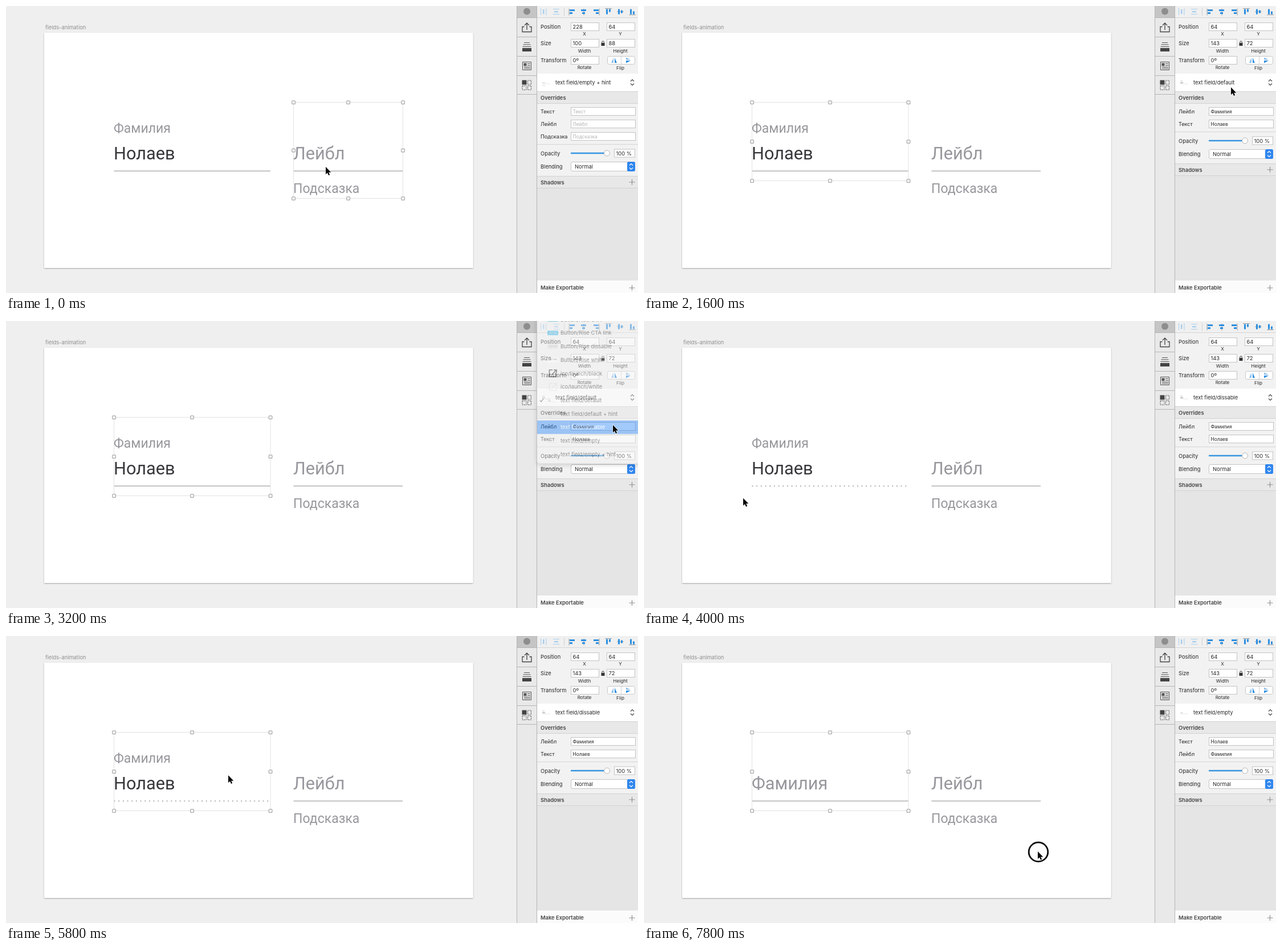
Animation of 1109x505 px, one loop 8 s. Source, as an HTML page:

```html
<!DOCTYPE html>
<html lang="ru">
<head>
<meta charset="utf-8">
<title>Text field symbols</title>
<style>
html, body { margin: 0; width: 100%; height: 100%; overflow: hidden; background: #efefef; }
svg { display: block; width: 100%; height: 100%; }
text { font: 9.35px Inter, sans-serif; fill: #262626; white-space: pre; }
.bold { font-weight: 600; fill: #444; }
.value { font-size: 8.3px; }
.small { font-size: 8.2px; text-anchor: middle; }
.tiny { font-size: 3px; }
.label { font: 23.04px Roboto, sans-serif; fill: #98979d; }
.input { font: 30.72px Roboto, sans-serif; fill: #38373c; }
.empty { fill: #98979d; }
</style>
</head>
<body>
<svg id="stage" viewBox="0 0 1109 505">
  <defs>
    <filter id="shadow" x="-20%" y="-20%" width="140%" height="140%">
      <feDropShadow dx="0" dy="1" stdDeviation="1.2" flood-opacity=".32"/>
    </filter>
    <filter id="menuShadow" x="-20%" y="-20%" width="140%" height="140%">
      <feDropShadow dx="0" dy="3" stdDeviation="4" flood-opacity=".35"/>
    </filter>
  </defs>
  <g id="base"></g>
  <g id="canvas"></g>
  <g id="panel"></g>
  <g id="menu"></g>
  <g id="pointer"></g>
</svg>
<script>
const LOOP = 8000, STEP = 200, ROW = 23.7, MENU_Y = 139.5;
const SURNAME = 'Нолаев';
const layer = id => document.getElementById(id);

const rect = (x, y, w, h, fill, extra = '') =>
  `<rect x="${x}" y="${y}" width="${w}" height="${h}" fill="${fill}" ${extra}/>`;
const path = (d, stroke, width = 1, extra = '') =>
  `<path d="${d}" fill="none" stroke="${stroke}" stroke-width="${width}" ${extra}/>`;
const text = (x, y, s, cls = '', extra = '') =>
  `<text x="${x}" y="${y}" class="${cls}" ${extra}>${s}</text>`;
const field = (x, y, w, s, cls = '', extra = '') =>
  rect(x + .5, y + .5, w - 1, 14, '#fff', 'stroke="#c3c3c3"') + text(x + 3.5, y + 11, s, cls, extra);
const header = (y, s) =>
  rect(932, y, 177, 22, '#e8e8e8') + path(`M932 ${y + .5}h177M932 ${y + 21.5}h177`, '#d2d2d2') +
  text(938, y + 14.5, s, 'bold');
const plus = y => path(`M1093.5 ${y}h10M1098.5 ${y - 5}v10`, '#8d8d8d', 1.1);
const chevrons = (x, y, color) =>
  path(`M${x - 3} ${y - 2}l3-3 3 3M${x - 3} ${y + 2}l3 3 3-3`, color, 1.2);

const SYMBOLS = {
  default: { rows: [['Лейбл', 'Фамилия'], ['Текст', SURNAME]] },
  dissable: { rows: [['Лейбл', 'Фамилия'], ['Текст', SURNAME]] },
  empty: { rows: [['Текст', SURNAME], ['Лейбл', 'Фамилия']] },
  'empty + hint': { rows: [['Текст'], ['Лейбл'], ['Подсказка']] }
};

const ITEMS = ['Button/Rise CTA', 'Button/Rise CTA link', 'Button/Rise dissable', 'Button/Rise white',
  'ico/launch/black', 'ico/launch/white', 'text field/default', 'text field/default + hint',
  'text field/dissable', 'text field/empty', 'text field/empty + hint'];

// Pointer tip: time, x, y
const TRACK = [
  [0, 561, 283], [200, 540, 272], [400, 440, 246], [600, 380, 233], [1000, 377, 232],
  [1200, 505, 222], [1400, 800, 180], [1600, 1030, 143], [1800, 1067, 136], [2200, 1067, 153],
  [2800, 1066, 182], [3200, 1065, 183], [3400, 650, 270], [3600, 126, 330], [3800, 126, 330],
  [4400, 270, 275], [4800, 321, 254], [5600, 321, 254], [5800, 390, 245], [6000, 528, 225],
  [6200, 880, 165], [6400, 1067, 137], [6800, 1070, 168], [7200, 1070, 167],
  [7400, 900, 270], [7600, 705, 372], [7800, 691, 379]
];
const CLICKS = [600, 1800, 3000, 3600, 4800, 6400, 7000, 7800];
const MENUS = [
  { open: 2000, fade: 3200, checked: 6 },
  { open: 6600, fade: 7200, checked: 8 }
];

function pointerAt(t) {
  const i = TRACK.findIndex(p => p[0] > t);
  if (i < 0) return TRACK[TRACK.length - 1].slice(1);
  const [a, x, y] = TRACK[i - 1], [b, u, v] = TRACK[i], k = (t - a) / (b - a);
  return [x + (u - x) * k, y + (v - y) * k];
}

function symbolAt(t) {
  return t < 600 ? 'empty + hint' : t < 3400 ? 'default' : t < 7400 ? 'dissable' : 'empty';
}

function drawBase() {
  const alignIcons = [993, 1014, 1036].map((x, i) =>
    path(`M${x + (i - 1) * 5} 4.5v12`, '#9b9b9b') +
    rect(x - [4, 5, 5][i], 6, 9, 3, '#2d8fe0') + rect(x - [4, 3, 1][i], 11, 5, 3, '#2d8fe0')).join('') +
    [1057, 1078, 1099].map((x, i) =>
      path(`M${x - 6} ${10 + (i - 1) * 5.5}h12`, '#9b9b9b') +
      rect(x - 4, 5.5, 3, 9, '#2d8fe0') + rect(x + 1, 5.5 + i * 2, 3, 5, '#2d8fe0')).join('');

  return rect(0, 0, 1109, 505, '#efefef') +
    text(69, 41, 'fields-animation', '', 'style="fill:#8e8e8e"') +
    rect(67, 47, 752.5, 414, '#fff', 'filter="url(#shadow)"') +
    // tool strip
    rect(897, 0, 35, 505, '#e9e9e9') + rect(897, 0, 35, 20, '#c5c5c5') +
    path('M896.5 0v505M931.5 0v505M897 20.5h34M897 54.5h34M897 88.5h34M897 122.5h34M897 155.5h34', '#b4b4b4') +
    '<circle cx="914" cy="9.5" r="6" fill="#8d8d8d"/>' +
    path('M909.5 36.5h-3.500v9h16v-9h-3.500M914 42v-11.500M910 34l4-4 4 4', '#444', 1.3) +
    path('M909 64.500h10M907.500 68h13M906.500 71.500h15', '#555', 1.1) + rect(906, 74, 16, 6, '#444') +
    path('M906.500 98.500h15v14h-15zM915 101.500h5M915 104.500h5M909 107.500h11M909 110h11', '#555') +
    rect(908.5, 100.5, 5, 5, '#555') +
    rect(905.5, 130.5, 8, 8, '#444') +
    path('M915.500 131h6v7h-6zM906 140.500h7v7h-7zM915.500 140.500h6v7h-6z', '#555', 1, 'stroke-dasharray="2 1.2"') +
    // inspector
    rect(932, 0, 177, 505, '#e5e5e5') + rect(932, 0, 177, 20, '#f0f0f0') +
    rect(932, 20, 177, 99, '#f2f2f2') + path('M932 20.5h177', '#d4d4d4') +
    path('M938.500 4v12M948 4v12M960 5.500h11M960 14.500h11', '#a9cfee') +
    rect(942, 6, 2.5, 8, '#a9cfee') + rect(962, 8.8, 7, 2.5, '#a9cfee') +
    path('M979.500 3v14', '#d0d0d0') + alignIcons +
    text(938, 39.5, 'Position') + text(938, 69, 'Size') + text(938, 98.5, 'Transform') +
    [['X', 1015, 52], ['Y', 1078, 52], ['Width', 1015, 82], ['Height', 1078, 82],
      ['Rotate', 1015, 111], ['Flip', 1078, 112]].map(([s, x, y]) => text(x, y, s, 'small')).join('') +
    rect(1044.5, 65, 6, 5, '#333') + path('M1045.800 65v-1.500a1.700 1.700 0 0 1 3.400 0v1.500', '#333') +
    field(991, 88, 50, '0º') +
    rect(1055.5, 88.5, 48, 14, '#fff', 'rx="3" stroke="#c6c6c6"') + path('M1079.500 89v13', '#d2d2d2') +
    '<path d="M1066 91v9h-4zM1088 94.500v-4l8 4z" fill="#8dbfea"/>' +
    '<path d="M1068 91v9h4zM1088 96v4.500l8-4.500z" fill="#2d8fe0"/>' +
    rect(932, 119, 177, 31, '#fff') + chevrons(1099, 134.5, '#444') +
    header(150, 'Overrides') +
    rect(932, 483, 177, 22, '#fbfbfb') + text(938, 499, 'Make Exportable', 'bold') + plus(496);
}

function selection(xs, ys) {
  const [l, , r] = xs, [top, , bottom] = ys;
  const handles = ys.flatMap((y, j) => xs.map((x, i) => i === 1 && j === 1 ? '' :
    rect(x - 2.7, y - 2.7, 5.6, 5.6, '#fff', 'rx="1" stroke="#a6a6a6" stroke-width="1.2"')));
  return rect(l, top, r - l, bottom - top, 'none', 'stroke="#e2e2e2"') + handles.join('');
}

function drawCanvas(t, symbol) {
  const dots = symbol === 'dissable' ? 'stroke-dasharray="1.92 5.76"' : '';
  const deselected = t >= 3800 && t < 5000;
  const left = symbol === 'empty' ? text(189, 270, 'Фамилия', 'input empty') :
    text(189, 223, 'Фамилия', 'label') + text(189, 270, SURNAME, 'input');
  const frame = deselected ? '' : t < 600 ?
    selection([504.5, 600.5, 696.5], [169.5, 254, 338.5]) :
    selection([189.5, 326.5, 464], [169.5, 238.5, 307.5]);
  return left + path('M189.500 290.300h274.500', '#a2a2a6', dots ? 1.7 : 1.2, dots) +
    text(504, 270, 'Лейбл', 'input empty') + path('M504.500 290.300h191.500', '#a2a2a6', 1.2) +
    text(504, 329, 'Подсказка', 'label') + frame;
}

function fieldIcon(x, y, name, color = '#9b9b9b') {
  const filled = !name.includes('empty');
  return path(`M${x} ${y + 3}h14`, color, .5, 'opacity=".5"') +
    path(`M${x} ${y + 1}h5`, color, 1.3, `opacity="${filled ? .9 : .4}"`) +
    (filled ? path(`M${x} ${y - 2}h4`, color, .8, 'opacity=".7"') : '') +
    (name.includes('hint') ? path(`M${x} ${y + 6}h6`, color, .8, 'opacity=".4"') : '');
}

function drawPanel(symbol) {
  const { rows } = SYMBOLS[symbol], hint = rows.length > 2;
  const end = 178 + 22 * rows.length, d = end - 222;
  const [x, w, h] = hint ? [228, 100, 88] : [64, 143, 72];
  const overrides = rows.map(([name, value], i) => text(938, 189 + 22 * i, name, '', 'style="font-size:9.100px"') +
    field(991, 178 + 22 * i, 114, value || name, 'value', value ? '' : 'style="fill:#b3b3b3"')).join('');
  return field(991, 29, 50, x) + field(1054, 29, 50, 64) + field(991, 58, 50, w) + field(1054, 58, 50, h) +
    fieldIcon(941, 134, symbol) + text(964, 138, 'text field/' + symbol) +
    rect(932, 172, 177, 105 + d, '#f2f2f2') + overrides +
    `<g transform="translate(0 ${d})">` + path('M932 221.500h177', '#d5d5d5') +
    text(938, 241, 'Opacity') + path('M992 237h60', '#3694df', 2.4, 'stroke-linecap="round"') +
    '<circle cx="1054.500" cy="237" r="5" fill="#fff" stroke="#b4b4b4"/>' + field(1067, 229.5, 37, '100 %') +
    text(938, 263.5, 'Blending') + rect(991.5, 252.5, 112, 16, '#fff', 'rx="2.500" stroke="#c4c4c4"') +
    text(998, 263.7, 'Normal') + rect(1090, 252, 14, 17, '#2f86ee', 'rx="2.500"') + chevrons(1097, 260.5, '#fff') +
    header(277, 'Shadows') + plus(288) + '</g>';
}

function itemIcon(name, y, hovered) {
  if (name.startsWith('text')) return fieldIcon(951, y, name, hovered ? '#1c5fbd' : '#9b9b9b');
  if (name.startsWith('ico')) {
    const black = name.endsWith('black');
    return path(`M959 ${y - 6}h-5.500v12h12v-5.500M961 ${y - 6}h5v5M965.500 ${y - 5.5}l-7.500 7.500`,
      black ? '#332f36' : '#d6d6d6', black ? 1.8 : 1.2);
  }
  const [fill, ink] = name.includes('CTA') ? ['#35b4e6', '#fff'] :
    name.endsWith('white') ? ['#fff', '#333'] : ['#dcdcdc', '#999'];
  return rect(950, y - 4, 19, 8, fill, 'rx="1"') + text(954, y + 1, 'BUTTON', 'tiny', `style="fill:${ink}"`);
}

function drawMenu(t, pointerY) {
  const menu = MENUS.find(m => t >= m.open && t <= m.fade);
  if (!menu) return '';
  const { checked, fade } = menu;
  const hover = checked + Math.round((pointerY - MENU_Y) / ROW);
  const centre = i => MENU_Y + (i - checked) * ROW;
  const bottom = centre(ITEMS.length - 1) + 16;
  const items = ITEMS.map((name, i) => {
    const y = centre(i), on = i === hover;
    return (on ? rect(932, y - ROW / 2, 177, ROW, '#328bf8') : '') + itemIcon(name, y, on) +
      text(973, y + 3.4, name, '', on ? 'style="fill:#fff"' : '') +
      (i === checked ? path(`M937 ${y}l2 2.500 4-5`, '#222', 1.2) : '');
  }).join('');
  return `<g opacity="${t === fade ? .45 : 1}">` +
    rect(931.5, -30, 200, bottom + 30, '#f0f0f0', 'rx="5" filter="url(#menuShadow)"') + items + '</g>';
}

function drawPointer(t, [x, y]) {
  const ring = CLICKS.includes(t) ?
    `<circle cx="${x + 1}" cy="${y + 1}" r="16.800" fill="none" stroke="#0b0b0b" stroke-width="2.800"/>` : '';
  return ring + `<path transform="translate(${x} ${y})" d="M0 0V13.200L3 10.500 5 15 7.200 14 5.200 9.700H9.300Z"
    fill="#080808" stroke="#fff" stroke-width="1.200" paint-order="stroke"/>`;
}

function render(t) {
  const symbol = symbolAt(t), tip = pointerAt(t);
  layer('canvas').innerHTML = drawCanvas(t, symbol);
  layer('panel').innerHTML = drawPanel(symbol);
  layer('menu').innerHTML = drawMenu(t, tip[1]);
  layer('pointer').innerHTML = drawPointer(t, tip);
}

let shown = -1;
const start = performance.now();
function tick() {
  const t = Math.floor((performance.now() - start) % LOOP / STEP) * STEP;
  if (t !== shown) render(shown = t);
  requestAnimationFrame(tick);
}
layer('base').innerHTML = drawBase();
tick();
</script>
</body>
</html>
```
